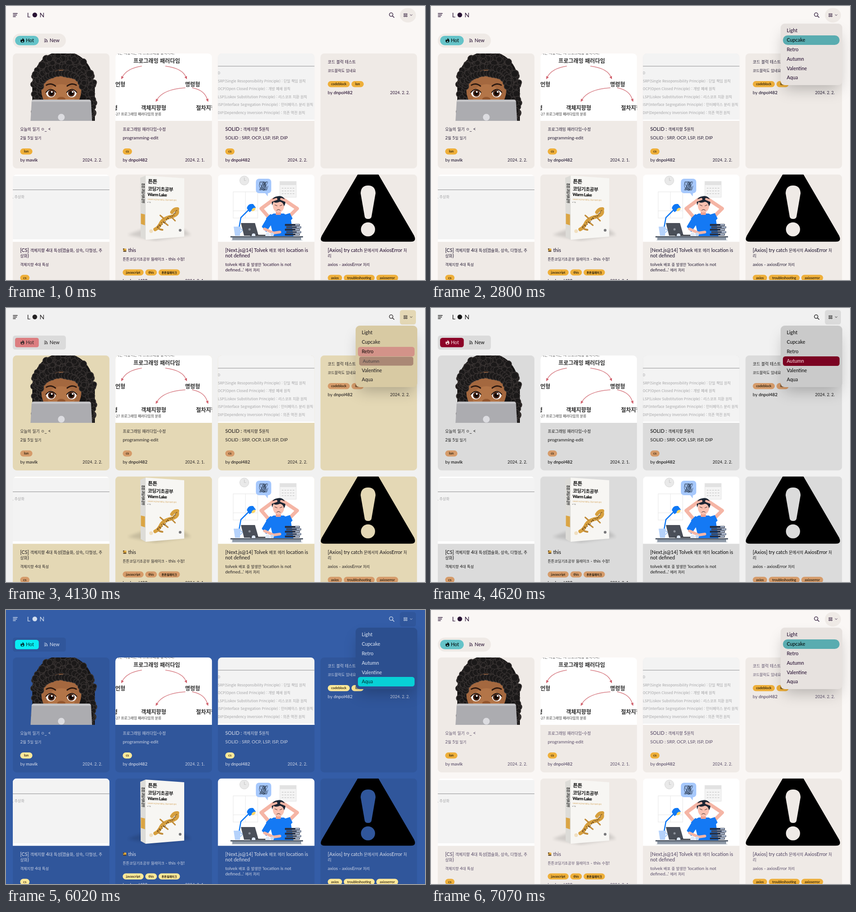
An HTML page for the animation above (7140 ms loop, 924x606 px).

```html
<!DOCTYPE html>
<html lang="ko">
<head>
<meta charset="utf-8">
<title>Blog themes</title>
<style>
html, body { margin: 0; width: 100%; height: 100%; overflow: hidden; }
body { background: var(--bg); font-family: Lato, "Noto Sans CJK KR", "Noto Sans CJK", sans-serif; }
#page { position: absolute; left: 0; top: 0; width: 924px; height: 606px; display: block; }
.ko { font-family: "Noto Sans CJK KR", "Noto Sans CJK", sans-serif; font-size: .81em; }
.art .ko { font-size: 1em; }
.title, .desc, .by { fill: var(--ink); }
.title { font-size: 10.8px; font-weight: 500; }
.desc { font-size: 10px; }
.by { font-size: 9.9px; }
.by b, .by .user { font-weight: 600; }
.date { font-size: 9.2px; text-anchor: end; }
.tag { font-size: 7.5px; font-weight: 600; text-anchor: middle; fill: #1b1406; }
.card { fill: var(--card); }
.head { fill: var(--head); }
.line { fill: none; stroke: var(--head); stroke-linecap: round; stroke-linejoin: round; }
.hot { fill: var(--pc); }
.big { font-size: 10.5px; font-weight: 500; }
.note { font: 500 8px "Noto Sans CJK KR", "Noto Sans CJK", sans-serif; fill: #a4a4a6; }
.hand { font: 700 12px "Noto Sans CJK KR", "Noto Sans CJK", sans-serif; fill: #2b2b2b; }
#menu {
  position: absolute; left: 771px; top: 38.5px; width: 135.5px; height: 135.5px; box-sizing: border-box;
  padding: 5.2px; border-radius: 9px; background: var(--panel);
  box-shadow: 0 16px 33px -8px #00000040; transform-origin: top;
}
.item {
  height: 20.85px; line-height: 20.6px; padding-left: 8.4px; font-size: 10.8px; font-weight: 500;
  border-radius: var(--r);
  color: color-mix(in srgb, var(--ownText) calc(var(--on) * 100%), var(--label));
  background: color-mix(in srgb, color-mix(in srgb, var(--own) 88%, #000) calc(var(--on) * 100%),
    color-mix(in srgb, var(--label) calc(var(--hov) * 20%), transparent));
}
</style>
</head>
<body>
<svg id="page" viewBox="0 0 924 606"></svg>
<div id="menu"></div>
<script>
const LOOP = 7140, OUT = 'cubic-bezier(0,0,.2,1)';
const THEMES = [
  { name: 'Light', bg: '#ffffff', box: '#f2f2f2', panel: '#e5e6e6', ink: '#1f2937', p: '#4a00ff', pc: '#d1dbff', tag: '#00d7c0', r: 5.2 },
  { name: 'Cupcake', bg: '#faf7f5', box: '#efeae6', panel: '#e7e2df', ink: '#291334', p: '#65c3c8', pc: '#040e0f', tag: '#eeaf3a', r: 19.8 },
  { name: 'Retro', bg: '#ece3ca', box: '#e4d8b4', panel: '#dbca9a', ink: '#282425', p: '#ef9995', pc: '#140808', tag: '#dc8850', r: 4.2 },
  { name: 'Autumn', bg: '#f1f1f1', box: '#dbdbdb', panel: '#cacaca', ink: '#141414', p: '#8c0327', pc: '#f5d6d9', tag: '#d59b6a', r: 5.2 },
  { name: 'Valentine', bg: '#fae7f4', box: '#e8d6e3', panel: '#d7c7d3', ink: '#632c3b', p: '#e96d7b', pc: '#130405', tag: '#88dbdd', r: 19.8 },
  { name: 'Aqua', bg: '#345da7', box: '#30569b', panel: '#2c4f8f', ink: '#d3deef', p: '#09ecf3', pc: '#01373a', tag: '#ffe999', r: 5.2 },
];
const START = 1;
// hover time, click time, theme index
const PICKS = [[1050, 1660, 0], [2420, 2540, 1], [3150, 3410, 2], [3900, 4120, 3], [4740, 4930, 4], [5500, 5665, 5], [6050, 6770, 1]];

/* ---------- drawing helpers ---------- */
const ko = s => s.replace(/[\u3131-\u318e\uac00-\ud7a3]+/g, '<tspan class="ko">$&</tspan>');
const text = (x, y, s, cls = '', more = '') => `<text x="${x}" y="${y}" class="${cls}" ${more}>${ko(s)}</text>`;
const rect = (x, y, w, h, fill, more = '') => `<rect x="${x}" y="${y}" width="${w}" height="${h}" fill="${fill}" ${more}/>`;
const disc = (x, y, r, fill, more = '') => `<circle cx="${x}" cy="${y}" r="${r}" fill="${fill}" ${more}/>`;
const oval = (x, y, rx, ry, fill, more = '') => `<ellipse cx="${x}" cy="${y}" rx="${rx}" ry="${ry}" fill="${fill}" ${more}/>`;
const path = (d, fill, more = '') => `<path d="${d}" fill="${fill}" ${more}/>`;
const stroke = (d, color, w, more = '') => path(d, 'none', `stroke="${color}" stroke-width="${w}" stroke-linecap="round" stroke-linejoin="round" ${more}`);

let seed = 7;
const rnd = () => (seed = seed * 16807 % 2147483647) / 2147483647;
const curl = (x, y) => {
  const r = 4.5 + rnd() * 3.5;
  return disc(x.toFixed(1), y.toFixed(1), r.toFixed(1), '#1b1919', 'stroke="#393433" stroke-width="1.3"');
};

/* ---------- card pictures ---------- */
function avatar() {
  let s = oval(126, 166, 66, 66, '#171515') + rect(58, 165, 30, 95, '#171515') + rect(168, 165, 28, 95, '#171515');
  for (let i = 0; i < 110; i++) {
    const a = Math.PI * (1 + rnd()), q = .6 + .38 * rnd();
    s += curl(126 + 68 * q * Math.cos(a), 172 + 68 * q * Math.sin(a));
  }
  for (let i = 0; i < 76; i++) s += curl((i % 2 ? 60 : 172) + rnd() * 23, 165 + rnd() * 90);
  s += oval(122, 187, 44, 46, '#a4683f') + oval(122, 199, 30, 26, '#b37548') + oval(122, 206, 9, 5, '#94572f');
  for (let i = 0; i <= 20; i++) {
    const a = Math.PI * (1 + i / 20);
    s += curl(122 + 46 * Math.cos(a), 178 + 29 * Math.sin(a)) + curl(122 + 50 * Math.cos(a), 170 + 36 * Math.sin(a));
  }
  for (const [x, d] of [[99, -1], [145, 1]]) {
    s += stroke(`M${x - 10} ${176 + d} Q${x} 169 ${x + 10} ${176 - d}`, '#2b1810', 3);
    s += oval(x, 193, 10.5, 9, '#fff') + disc(x - d, 193, 7.5, '#4b2617') + disc(x - d, 193, 4.3, '#0d0706') + disc(x + 2, 190, 2, '#fff');
    s += stroke(`M${x - 11} 191 Q${x} 178 ${x + 11} 191`, '#1a0e0a', 2);
  }
  return s + path('M62 207 H182 Q187 207 187.500 212 L190 256 H54 L56.500 212 Q57 207 62 207Z', '#acacb0')
    + path('M62 207 H182 Q187 207 187.500 212 H56.500 Q57 207 62 207Z', '#c3c3c6') + disc(122, 246, 7.5, '#dcdce0');
}

function paradigm() {
  const arrow = (d, x, y, a) => stroke(d, '#d9838a', 1.6)
    + path('M0 0 L-6.500 -3 L-6.500 3Z', '#d0606c', `transform="translate(${x} ${y}) rotate(${a})"`);
  return rect(241, 105, 214, 149, '#fff')
    + text(243, 107, '하는 사용하는 시 프로그래밍 방식이다.', 'note', 'style="fill:#444"')
    + text(281, 126, '프로그래밍 패러다임', 'hand')
    + arrow('M299 133 Q266 138 256 158', 254, 162, 118) + arrow('M352 133 Q390 138 397 158', 399, 162, 65)
    + arrow('M395 181 Q347 184 333 207', 330, 212, 122) + arrow('M411 181 Q438 186 444 207', 446, 212, 68)
    + text(241, 178, '언형', 'hand') + text(395, 178, '명령형', 'hand') + text(235, 230, '형', 'hand')
    + text(298, 230, '객체지향형', 'hand') + text(419, 230, '절차지향형', 'hand')
    + text(240, 242, '-27 프로그래밍 패러다임의 분류', 'note', 'style="fill:#333;font-size:7.7px;font-weight:400"');
}

function solid() {
  const rows = ['SRP(Single Resoponsibility Principle) : 단일 책임 원칙', 'OCP(Open Closed Principle) : 개방 폐쇄 원칙',
    'LSP(Liskov Substitution Principle) : 리스코프 치환 원칙', 'ISP(Interface Segregation Principle) : 인터페이스 분리 원칙',
    'DIP(Dependency Inversion Principle) : 의존 역전 원칙'];
  return rect(467, 105, 214, 149, '#f3f3f3') + rect(467, 251.5, 214, 3, '#fff') + rect(467, 132.6, 214, 1, '#8e8e90')
    + text(467, 151, 'D', 'note') + rows.map((r, i) => text(467, 168.5 + 17.6 * i, r, 'note')).join('');
}

const oop = () => rect(15, 372, 214, 150, '#fff') + rect(15, 376, 214, 140, '#f3f3f3')
  + rect(15, 406, 214, 1, '#8e8e90') + text(14, 425, ', 추상화', 'note');

function book() {
  const face = (x, y, s, size, more = '') => text(x, y, s, '', `font-size="${size}" font-weight="900" fill="#161616" letter-spacing="-.6" ${more}`);
  let s = path('M268 506 L306 492 L393 494 L408 506 L330 519Z', '#000', 'opacity=".13" filter="url(#soft)"')
    + path('M296 380 L308 375 V517 L297 511Z', '#dddcd8') + path('M308 375 L393 381 V510 L308 517Z', '#f7f6f3')
    + path('M297.500 459 L306.500 461 V485 L297.500 482Z', '#dba544')
    + face(0, 0, '튼튼 코딩기초공부', 6.5, 'transform="translate(299.500 392) rotate(90)"')
    + `<g transform="rotate(2 313 391)">` + face(313, 392, '튼튼', 11.5) + face(313, 408, '코딩기초공부', 10.8) + face(313, 420, 'Warm Lake', 9.4)
    + text(313, 429, '기초부터 차근차근 배우는 코딩의 동작 원리', '', 'font-size="3.6" fill="#c98a2b"')
    + text(313, 435, '● 지음', '', 'font-size="3" fill="#555"') + '</g>';
  s += stroke('M377 451 Q381 462 364 466 Q346 470 341 481 Q336 491 329 494', '#d7a03e', 8)
    + stroke('M378 449 Q371 448 366 456', '#d7a03e', 8) + stroke('M338 484 Q330 493 345 495', '#c18c3a', 4)
    + stroke('M364 466 L373 475 M348 470 L340 463 M346 476 L357 485', '#c18c3a', 3);
  for (let i = 0; i < 26; i++) {
    const t = i / 25;
    s += disc((375 - 43 * t + rnd() * 4).toFixed(1), (453 + 37 * t + rnd() * 5 - 2).toFixed(1), .9, '#4a3018');
  }
  return s + disc(320, 498, 4, '#f0dfc0') + disc(384, 496, 3, '#77777a');
}

function worker() {
  let knot = 'M';
  for (let i = 0; i <= 90; i++) {
    const a = i * .42;
    knot += `${(568 + 9.5 * Math.cos(a) * Math.cos(a * .37)).toFixed(1)} ${(398 + 9.5 * Math.sin(a * 1.13)).toFixed(1)} `;
  }
  let s = rect(467, 372, 214, 150, '#fff')
    + disc(525.5, 386, 10, '#e9e9e9', 'stroke="#d5d5d5"') + stroke('M525.500 380 V386 H529', '#bbb', .8)
    + rect(501, 411, 54, 58, 'none', 'stroke="#e6e6e6"') + stroke('M528 411 V469 M501 453 H555', '#e6e6e6', 1)
    + rect(604, 388, 36, 35, '#f4f4f4', 'stroke="#e2e2e2"') + rect(604, 388, 36, 8, '#e2e2e2')
    + stroke('M609 403 H635 M609 409 H635 M609 415 H635', '#d5d5d5', 2, 'stroke-dasharray="2 4"')
    + rect(551, 382, 34, 32, '#a6c8fc', 'rx="7"') + path('M570 412 L577 421 L578 411Z', '#a6c8fc') + stroke(knot, '#26354a', .8)
    + stroke('M514 490 L518 468 L537 449', '#0e78f5', 2.5) + path('M531 447 Q534 436 545 438 L551 446 L537 456Z', '#0e78f5')
    + oval(546, 450, 5, 3, '#ffd76a', 'transform="rotate(-38 546 450)"');
  s += path('M590 459 H613 L628 470 L634 510 H590 L584 485 L574 500 L564 488 L577 466Z', '#1479f4')
    + stroke('M580 468 L563 448 L590 428', '#f5b5a5', 8) + stroke('M622 468 L642 448 L612 428', '#f5b5a5', 8)
    + path('M573 470 L583 460 L592 466 L584 480Z M613 462 L626 458 L632 470 L622 480Z', '#1479f4')
    + rect(595, 450, 11, 12, '#ee9f8f') + oval(601, 441, 12.5, 16, '#f9c0b0')
    + path('M587 441 Q583 423 598 421 Q610 418 615 428 Q618 436 613 443 Q611 433 604 433 Q594 437 590 433Z', '#1c2533')
    + stroke('M593 440 L598 442 M604 442 L609 440 M597 452 Q601 448 605 452', '#3a2a2a', 1)
    + stroke('M585 431 L596 427 M617 431 L607 427', '#f5b5a5', 5) + stroke('M570 493 L590 502 L604 500', '#f5b5a5', 6);
  s += path('M518 480 H549 L557 508 H525Z', '#4a4f59') + disc(537, 494, 2.5, '#8b909a') + rect(538, 506, 34, 2.5, '#32363e')
    + path('M502 488 H518 L516 508 H505Z', '#b5d2fb') + stroke('M518 493 Q524 496 517 501', '#8db9f7', 1.5)
    + disc(546, 507, 4, '#dfe9f8') + disc(577, 506, 5, '#dfe9f8') + disc(587, 505, 4, '#c7d9f3');
  for (let i = 0; i < 5; i++) {
    const x = 615 + (i % 2) * 3;
    s += rect(x, 482 + i * 5.3, 33, 4.4, i % 2 ? '#3d4a63' : '#263147', 'rx="1"') + rect(x + 23, 483 + i * 5.3, 9, 2, '#cfdcf0');
  }
  return s + rect(495, 509, 160, 3, '#59626f') + rect(499, 512, 152, 6, '#8d98a6') + rect(497, 517.5, 157, 1.5, '#d8dde3');
}

const warning = () => path('M776 372 L697 507 Q689 521.500 704 521.500 H892 Q907 521.500 899.500 507 L821 372Z', '#000')
  + path('M782 414 Q783 397 798.500 397 Q814 397 815 414 L806 466 Q805 471 798.500 471 Q792 471 791 466Z', 'var(--card)')
  + disc(798.3, 494, 15.6, 'var(--card)');

/* ---------- page ---------- */
const CARDS = [
  { art: avatar, title: ['오늘의 일기 ㅇ_ &lt;'], desc: ['2월 5일 일기'], tags: [['lon', 27]], by: 'mavik', date: '2024. 2. 2.' },
  { art: paradigm, title: ['프로그래밍 패러다임-수정'], desc: ['programming-edit'], tags: [['cs', 20.5]], by: 'dnpol482', date: '2024. 2. 1.' },
  { art: solid, title: ['SOLID : 객체지향 5원칙'], desc: ['SOLID : SRP, OCP, LSP, ISP, DIP'], tags: [['cs', 20.5]], by: 'dnpol482', date: '2024. 2. 2.' },
  { title: ['코드 블럭 테스트'], desc: ['코드블럭도 있네요'], tags: [['codeblock', 48.5], ['lon', 27]], by: 'dnpol482', date: '2024. 2. 2.' },
  { art: oop, title: ['[CS] 객체지향 4대 특성(캡슐화, 상속, 다형성, 추', '상화)'], desc: ['객체지향 4대 특성'], tags: [['cs', 20.5]] },
  { art: book, icon: true, title: ['this'], desc: ['튼튼코딩기초공부 웜레이크 - this 수정!'], tags: [['javascript', 46], ['this', 25.5], ['튼튼웜레이크', 47]], by: 'dnpol482', date: '2024. 2. 1.' },
  { art: worker, title: ['[Next.js@14] Tolvek 배포 에러 location is', 'not defined'], desc: ["tolvek 배포 중 발생한 'location is not", "defined...' 에러 처리"], tags: [] },
  { art: warning, title: ['[Axios] try catch 문에서의 AxiosError 처', '리'], desc: ['axios - axiosError 처리'], tags: [['axios', 31.5], ['troubleshooting', 68], ['axioserror', 48]] },
];

function card(c, i) {
  const x = 15 + 226.1 * (i % 4), y = i < 4 ? 105 : 372.5, w = 213.3, left = x + 16.3;
  let s = `<clipPath id="c${i}">${rect(x, y, w, i < 4 ? 254.3 : 260, '#000', 'rx="8.500"')}</clipPath>`;
  s += `<g clip-path="url(#c${i})">` + rect(x, y, w, 260, 'var(--card)');
  if (c.art) s += `<svg class="art" x="${x}" y="${y}" width="${w}" height="149" viewBox="${x} ${y} ${w} 149">${c.art()}</svg>`;
  s += '</g>';
  let ty = y + (c.art ? 171 : 22);
  if (c.icon) s += rect(left + 1, ty - 7, 7, 5, '#e0a93b', 'rx="1.500"') + rect(left + 1, ty - 2.5, 7, 2.5, '#5d4425', 'rx="1"') + disc(left + 2, ty - 6, 1.5, '#5d4425');
  c.title.forEach((t, n) => s += text(left + (c.icon ? 12 : 0), ty + 12 * n, t, 'title'));
  ty += 12 * (c.title.length - 1) + 19;
  c.desc.forEach((t, n) => s += text(left, ty + 12.5 * n, t, 'desc'));
  ty += 12.5 * (c.desc.length - 1) + 20;
  let tx = left;
  for (const [t, tw] of c.tags) {
    s += rect(tx, ty, tw, 13.6, 'var(--tag)', 'rx="6.800"') + text(tx + tw / 2, ty + 9.2, t, 'tag');
    tx += tw + 3.8;
  }
  if (c.by) s += text(left, ty + 28.5, `by <tspan class="user">${c.by}</tspan>`, 'by') + text(x + 197, ty + 28.5, c.date, 'by date', 'style="font-size:9.2px"');
  return s;
}

const line = (d, w) => `<path class="line" d="${d}" stroke-width="${w}"/>`;
const flame = 'M36.500 71 Q40.500 74 40.500 77 Q40.500 81 36.300 81 Q32 81 32 77 Q32 75 33.500 73.500 Q34 75 35 75 Q36.800 74 36.500 71Z';
document.getElementById('page').innerHTML =
  '<defs><filter id="soft"><feGaussianBlur stdDeviation="3"/></filter></defs>'
  + line('M15.800 16.500 H25 M15.800 20 H23.500 M15.800 23.500 H21', 1.3)
  + text(46.5, 24.8, 'L', 'head', 'font-size="14"') + disc(63.5, 19.8, 5.2, 'var(--head)') + text(74, 24.8, 'N', 'head', 'font-size="14"')
  + '<circle class="line" cx="849.300" cy="19" r="3.900" stroke-width="1.300"/>' + line('M852.300 22 L855.800 25.300', 1.4)
  + rect(868.6, 4.4, 35.4, 32, 'var(--card)', 'style="rx:var(--r);ry:min(var(--r),16px)"')
  + rect(868.6, 4.4, 35.4, 32, '#000', 'id="shade" style="rx:var(--r);ry:min(var(--r),16px)"')
  + line('M877.800 17 H884.500 V19 H877.800Z M877.800 21 H880.300 V23.600 H877.800Z M882.300 21 H884.500 V23.600 H882.300Z', .9)
  + line('M891.300 19 L893.500 21.200 L895.700 19', .9)
  + rect(15, 61, 117, 31, 'var(--box)', 'style="rx:min(var(--r),15.5px)"')
  + rect(20, 66, 52.3, 20.8, 'var(--p)', 'style="rx:min(var(--rh),10.4px)"')
  + `<path class="hot" d="${flame}"/>` + disc(36.4, 78.6, 1.7, 'var(--p)')
  + text(44, 79.6, 'Hot', 'hot big') + text(96.3, 79.6, 'New', 'head big')
  + line('M84.800 73 Q91 73 91 79.700 M84.800 76 Q88 76 88 79.700', 1.2) + disc(85.4, 79.2, 1, 'var(--head)')
  + CARDS.map(card).join('');

/* ---------- motion ---------- */
const register = (syntax, initialValue, names) =>
  names.forEach(n => CSS.registerProperty({ name: '--' + n, syntax, inherits: true, initialValue }));
register('<color>', 'black', ['bg', 'box', 'card', 'panel', 'ink', 'head', 'label', 'p', 'pc', 'tag']);
register('<length>', '0px', ['r', 'rh']);
register('<number>', '0', ['on', 'hov']);

// cues are [time, duration, value]
function play(el, prop, first, cues, easing = OUT) {
  const frames = [{ offset: 0, [prop]: first }];
  let last = first;
  for (const [t, d, v] of cues) {
    frames.push({ offset: t / LOOP, [prop]: last, easing }, { offset: Math.min(1, (t + d) / LOOP), [prop]: v });
    last = v;
  }
  frames.push({ offset: 1, [prop]: last });
  el.animate(frames, { duration: LOOP, iterations: Infinity });
}

const root = document.documentElement;
function follow(prop, key, dur, easing) {
  const value = k => key === 'r' ? THEMES[k].r + 'px' : THEMES[k][key];
  play(root, '--' + prop, value(START), PICKS.map(([, t, k]) => [t, dur, value(k)]), easing);
}
for (const key of ['bg', 'box', 'tag', 'r']) follow(key, key, 0);
for (const key of ['p', 'pc', 'panel']) follow(key, key, 200);
follow('rh', 'r', 200);
follow('head', 'ink', 200);
follow('label', 'ink', 300, 'ease');
follow('card', 'box', 300, 'ease');
follow('ink', 'ink', 370, 'ease-in');

const menu = document.getElementById('menu');
play(menu, 'opacity', 0, [[530, 220, 1]]);
play(menu, 'transform', 'scale(.95)', [[530, 220, 'scale(1)']]);
play(document.getElementById('shade'), 'opacity', 0, [[330, 130, .08], [1040, 200, 0]]);

THEMES.forEach((theme, k) => {
  const item = document.createElement('div');
  item.className = 'item';
  item.textContent = theme.name;
  item.style.setProperty('--own', theme.p);
  item.style.setProperty('--ownText', theme.pc);
  menu.append(item);
  const on = [], hov = [], press = [];
  PICKS.forEach(([enter, click, pick], n) => {
    const next = PICKS[n + 1];
    if (pick === k) {
      hov.push([enter, 180, 1]);
      on.push([click, 200, 1]);
      press.push([click - 115, 40, 'scale(.957)'], [click + 25, 60, 'scale(1)']);
      if (next) {
        hov.push([next[0], 110, 0]);
        on.push([next[1], 200, 0]);
      }
    } else if (n === 0 && k === START) on.push([click, 200, 0]);
  });
  play(item, '--on', k === START ? 1 : 0, on);
  play(item, '--hov', 0, hov);
  play(item, 'transform', 'scale(1)', press);
});
</script>
</body>
</html>
```
